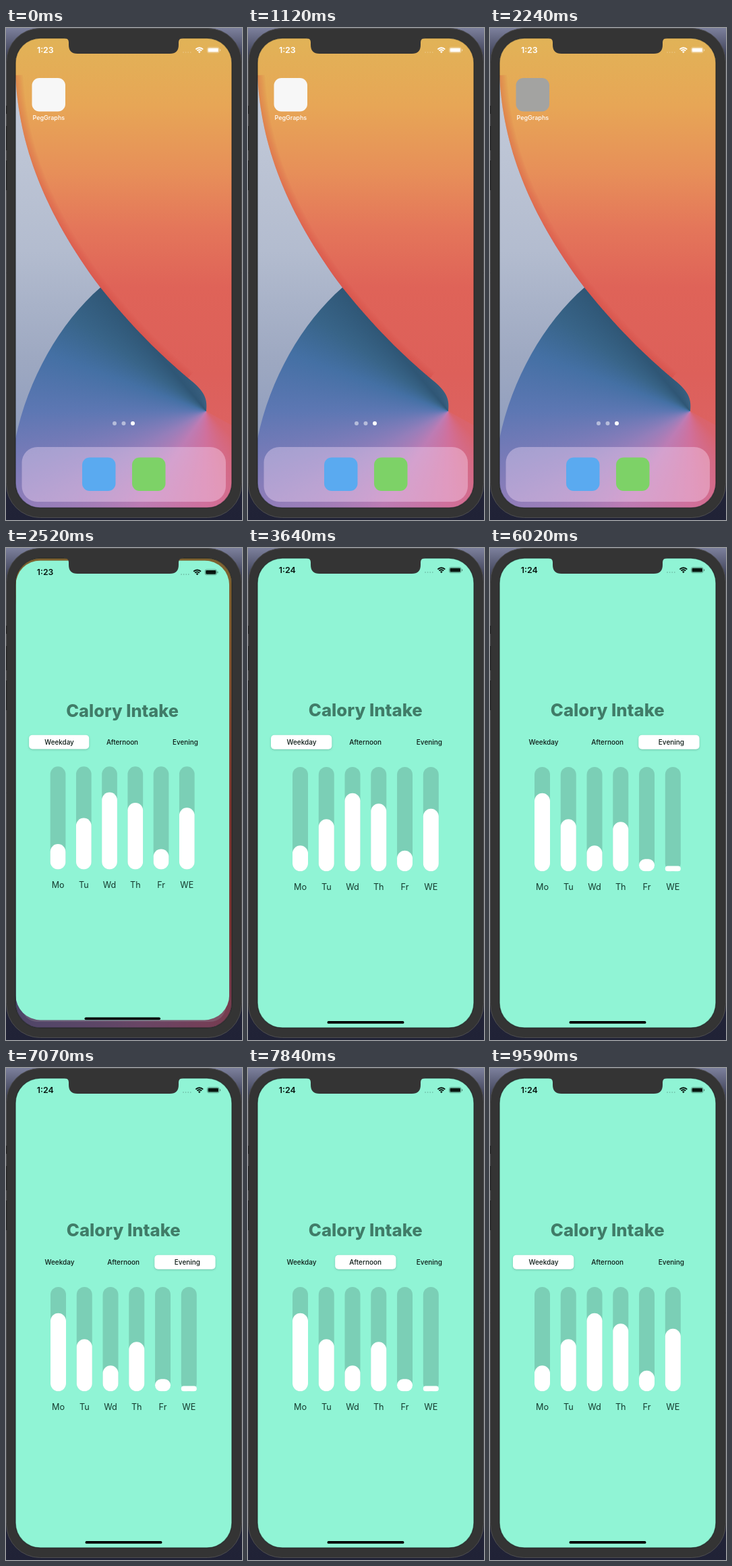
These frames come from a looping animation (350x728 px, 9730 ms). An HTML page with a canvas:

```html
<!DOCTYPE html>
<html lang="en">
<head>
<meta charset="utf-8">
<title>Calory Intake</title>
<style>
  html, body { margin: 0; width: 100%; height: 100%; overflow: hidden; background: #24263a; }
  canvas { display: block; width: 350px; height: 728px; }
</style>
</head>
<body>
<canvas id="stage"></canvas>
<script>
const W = 350, H = 728, LOOP = 9730;
const PRESS = 2130, LAUNCH = 2245, SETTLED = LAUNCH + 900, MINUTE = 3300;
const SCREEN = { x: 14, y: 15, w: 321, h: 695, r: 37 };
const ICON = { x: 38.5, y: 74, w: 49.5, h: 49.5, r: 11 };

const DAYS = ['Mo', 'Tu', 'Wd', 'Th', 'Fr', 'WE'];
const TABS = ['Weekday', 'Afternoon', 'Evening'];
const TAB_X = [34, 128.5, 220.3];
const INTAKE = [
  [38, 77, 115.5, 100, 30.5, 92.5],
  [68, 77, 86, 90, 25.5, 60],
  [115.5, 77, 38, 73, 18, 7.7]
];
// [time, tab]
const TAPS = [[3800, 1], [5150, 2], [7510, 1], [8750, 0]];

const canvas = document.getElementById('stage');
const ctx = canvas.getContext('2d');
const dpr = window.devicePixelRatio || 1;
canvas.width = W * dpr;
canvas.height = H * dpr;

const clamp = v => Math.min(1, Math.max(0, v));
const mix = (a, b, k) => a + (b - a) * k;
const ease = v => (1 - Math.cos(Math.PI * clamp(v))) / 2;
const tabbed = (t, values, delay, span) => TAPS.reduce(
  (v, [start, tab]) => mix(v, values[tab], ease((t - start - delay) / span)), values[0]);

function box(x, y, w, h, r, fill) {
  ctx.beginPath();
  ctx.roundRect(x, y, w, h, r);
  if (fill) { ctx.fillStyle = fill; ctx.fill(); }
}

function disc(x, y, r, fill) {
  ctx.beginPath();
  ctx.arc(x, y, r, 0, Math.PI * 2);
  ctx.fillStyle = fill;
  ctx.fill();
}

function label(text, x, y, size, weight, fill) {
  ctx.font = `${weight} ${size}px Inter, Roboto, sans-serif`;
  ctx.textAlign = 'center';
  ctx.fillStyle = fill;
  ctx.fillText(text, x, y);
}

function gradient(g, stops) {
  stops.forEach(([at, color]) => g.addColorStop(at, color));
  return g;
}
const vertical = (y0, y1, stops) => gradient(ctx.createLinearGradient(0, y0, 0, y1), stops);

function statusBar(time, ink, dots) {
  label(time, 58.3, 37, 12.4, 600, ink);
  for (let i = 0; i < 4; i++) disc(263 + i * 3.6, 36, 0.8, dots);
  ctx.strokeStyle = ctx.fillStyle = ink;
  ctx.lineWidth = 1.9;
  for (const r of [7.7, 4.8]) {
    ctx.beginPath();
    ctx.arc(286.8, 37, r, -Math.PI * 0.75, -Math.PI * 0.25);
    ctx.stroke();
  }
  ctx.beginPath();
  ctx.moveTo(286.8, 37.2);
  ctx.arc(286.8, 37, 2.7, -Math.PI * 0.75, -Math.PI * 0.25);
  ctx.fill();
  ctx.globalAlpha *= 0.45;
  box(298.5, 28.7, 17.6, 8, 2.4);
  ctx.lineWidth = 0.8;
  ctx.stroke();
  box(317, 31.2, 1.2, 3, 0.6, ink);
  ctx.globalAlpha /= 0.45;
  box(299.6, 29.8, 15.4, 5.8, 1.4, ink);
}

const fold = 'M14 70C19 172 56 272 140 384C190 446 230 484 270 518';
const edge = new Path2D(fold);
const orange = new Path2D(fold + 'C290 534 300 545 297 567L335 588V15H14Z');
const blue = new Path2D('M140 384C80 436 32 520 14 608V710H335V384Z');

function wallpaper() {
  ctx.fillStyle = vertical(60, 600, [[0, '#c5ccda'], [0.5, '#b3bccf'], [0.8, '#9da8c1'], [1, '#919ebe']]);
  ctx.fillRect(14, 15, 321, 695);
  const rays = [[0, '#dc6262'], [45, '#d9646f'], [90, '#d0709c'], [125, '#bd7cb4'], [150, '#967eba'],
    [165, '#7a7bb8'], [180, '#5d77b3'], [200, '#4470a4'], [215, '#386488'], [230, '#2f5675'],
    [270, '#3c6384'], [360, '#dc6262']];
  ctx.fillStyle = gradient(ctx.createConicGradient(0, 297, 567), rays.map(([a, c]) => [a / 360, c]));
  ctx.fill(blue);
  ctx.fillStyle = vertical(15, 600, [[0, '#e1b357'], [0.17, '#e7a656'], [0.34, '#e78f59'],
    [0.48, '#e4765a'], [0.63, '#df6358'], [0.85, '#dd605a'], [1, '#dc6262']]);
  ctx.fill(orange);
  // soft shade along the fold
  ctx.save();
  ctx.clip(orange);
  ctx.strokeStyle = 'rgba(196, 66, 52, 0.055)';
  for (let w = 2; w < 24; w += 4) {
    ctx.lineWidth = w;
    ctx.stroke(edge);
  }
  ctx.restore();
}

function home(pressed) {
  wallpaper();
  statusBar('1:23', '#fff', 'rgba(255,255,255,0.3)');
  box(ICON.x, ICON.y, ICON.w, ICON.h, ICON.r, pressed ? '#a3a3a1' : '#f7f7f7');
  label('PegGraphs', 63.3, 136, 9, 500, '#fff');
  [161, 174.5, 188].forEach((x, i) => disc(x, 585, 3, i === 2 ? '#fff' : 'rgba(255,255,255,0.5)'));
  box(23.5, 620, 302.5, 81, 23, 'rgba(252,226,252,0.36)');
  box(113, 635.5, 49.5, 49.5, 11, '#5aaaf0');
  box(187, 635.5, 49.5, 49.5, 11, '#7dd267');
}

function app(t) {
  ctx.fillStyle = '#90f4d5';
  ctx.fillRect(SCREEN.x, SCREEN.y, SCREEN.w, SCREEN.h);
  statusBar(t < MINUTE ? '1:23' : '1:24', '#07150f', '#65ac97');
  label('Calory Intake', 174.3, 249.3, 25.7, 800, '#407c68');

  ctx.save();
  ctx.shadowColor = 'rgba(0,0,0,0.2)';
  ctx.shadowBlur = 3 * dpr;
  ctx.shadowOffsetY = dpr;
  box(tabbed(t, TAB_X, 0, 350), 276.7, 90.3, 21, 5, '#fff');
  ctx.restore();
  TABS.forEach((name, i) => label(name, 79.5 + i * 94.7, 291, 10, 500, '#0c1a15'));

  DAYS.forEach((day, i) => {
    const x = 77.5 + i * 38.76;
    const h = tabbed(t, INTAKE.map(row => row[i]), 330, 400);
    box(x - 11.5, 324, 23, 154.3, 11.5, '#7bcfb6');
    box(x - 11.5, 478.3 - h, 23, h, Math.min(11.5, h / 2), '#fff');
    label(day, x, 505.6, 12.7, 400, '#143a2e');
  });
  box(117.5, 700, 114, 3.8, 1.9, '#000');
}

// The window grows from the icon around a moving centre; its height trails its width.
function launch(t) {
  const s = (t - LAUNCH) * 0.0222;
  const k = 1 - (1 + s) * Math.exp(-s);
  ctx.fillStyle = `rgba(0,0,0,${0.45 * k})`;
  ctx.fillRect(SCREEN.x, SCREEN.y, SCREEN.w, SCREEN.h);
  const w = mix(ICON.w, SCREEN.w, k);
  const h = mix(ICON.h, SCREEN.h, k ** 1.5);
  const x = mix(ICON.x + ICON.w / 2, SCREEN.x + SCREEN.w / 2, k) - w / 2;
  const y = mix(ICON.y + ICON.h / 2, SCREEN.y + SCREEN.h / 2, k) - h / 2;
  const zoom = w / SCREEN.w;
  ctx.save();
  ctx.globalAlpha = clamp(k * 4);
  box(x, y, w, h, mix(ICON.r, SCREEN.r, k));
  ctx.clip();
  ctx.translate(x, y);
  ctx.scale(zoom, zoom);
  ctx.translate(-SCREEN.x, -SCREEN.y);
  app(t);
  ctx.restore();
}

const notch = new Path2D('M86 14V15Q93 15 93 21V25Q93 38 106 38H243Q256 38 256 25V21Q256 15 263 15V14Z');

function phone() {
  ctx.fillStyle = vertical(0, H, [[0, '#7c809c'], [0.06, '#3a3d52'], [1, '#202236']]);
  ctx.fillRect(0, 0, W, H);
  box(0.5, 0.5, 349, 724, 50, '#343434');
  ctx.strokeStyle = '#4d4d50';
  ctx.lineWidth = 1;
  ctx.stroke();
  [[115, 12], [145, 36], [196, 44]].forEach(([y, h]) => box(0, y, 1.5, h, 0, '#252527'));
}

function draw(t) {
  ctx.setTransform(dpr, 0, 0, dpr, 0, 0);
  phone();
  ctx.save();
  box(SCREEN.x, SCREEN.y, SCREEN.w, SCREEN.h, SCREEN.r);
  ctx.clip();
  if (t < SETTLED) home(t >= PRESS);
  if (t >= SETTLED) app(t);
  else if (t >= LAUNCH) launch(t);
  ctx.restore();
  box(SCREEN.x, SCREEN.y, SCREEN.w, SCREEN.h, SCREEN.r);
  ctx.strokeStyle = 'rgba(28,32,32,0.6)';
  ctx.lineWidth = 1.5;
  ctx.stroke();
  ctx.fillStyle = '#343434';
  ctx.fill(notch);
}

const begin = performance.now();
function tick() {
  draw((performance.now() - begin) % LOOP);
  requestAnimationFrame(tick);
}
tick();
</script>
</body>
</html>
```
